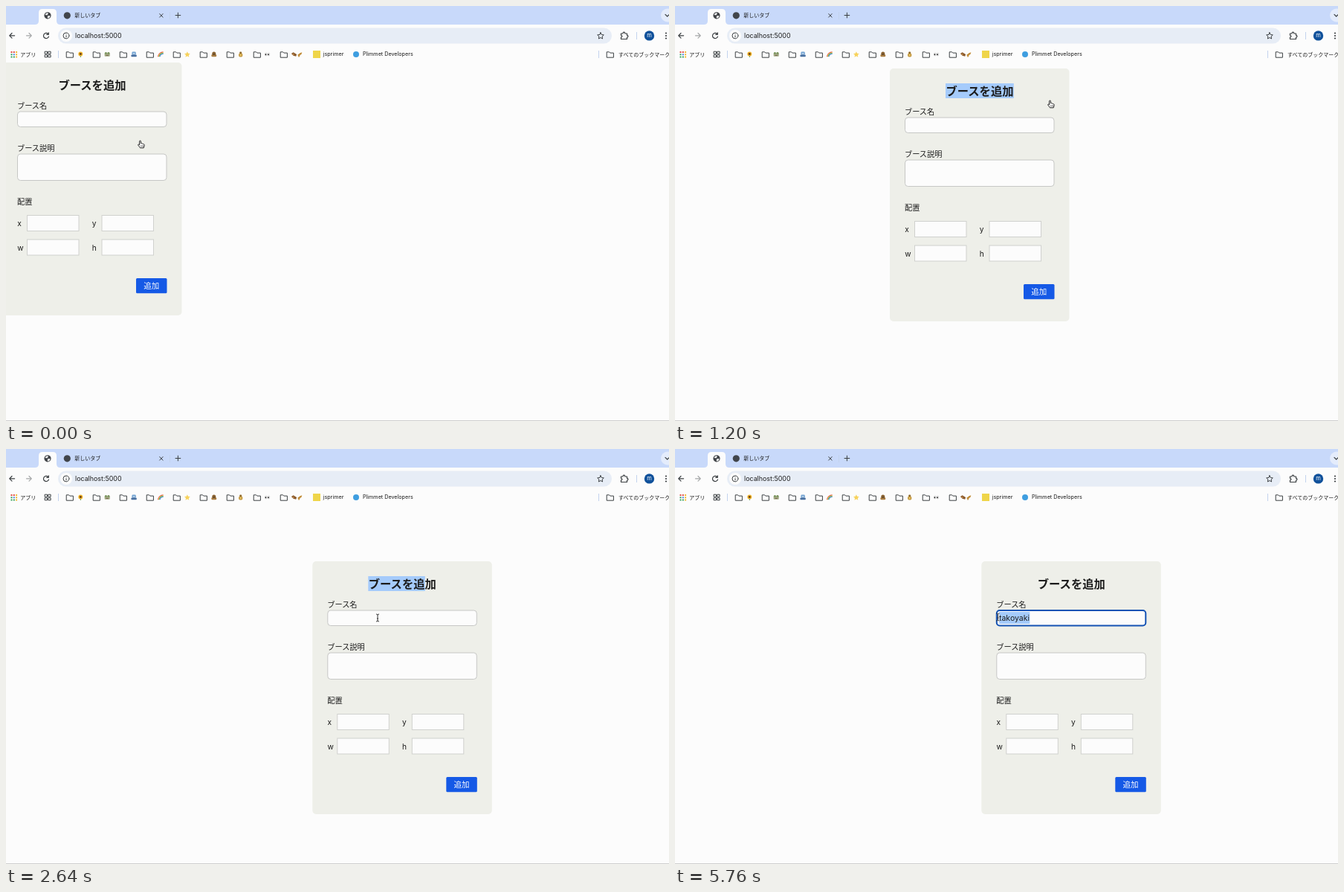
Recreate the animation shown at these times as an HTML page. Size 892 by 558 pixels, loop 5840 ms.

```html
<!DOCTYPE html>
<html lang="ja">
<head>
<meta charset="utf-8">
<title>ブースを追加</title>
<style>
html, body { margin: 0; width: 100%; height: 100%; overflow: hidden; background: #fcfcfc; }
svg { display: block; width: 892px; height: 558px; }
text { font-family: Inter, "Noto Sans CJK JP", sans-serif; fill: #1c1c1c; white-space: pre; }
.line { fill: none; stroke: #3c4043; stroke-width: 1.2; stroke-linecap: round; stroke-linejoin: round; }
.thin { stroke-width: 1; }
.field { fill: #fcfcfc; stroke: #c6c7c5; stroke-width: 1; }
.small { stroke: #d0d1ce; }
.focus { stroke: #1453b4; stroke-width: 2; }
</style>
</head>
<body>
<svg viewBox="0 0 892 558">
  <g id="chrome"></g>
  <g id="panel"></g>
  <g id="hand" stroke="#222" stroke-linejoin="round">
    <path d="M-2.400 .9V-4a.9 .9 0 0 1 1.800 0V-1.200c.6-.5 1.400-.3 1.700 .3 .6-.3 1.300 0 1.500 .6 .8-.2 1.500 .3 1.500 1.100 0 1.700-.3 2.500-.9 4H-1.500c-.5-1.300-1.700-2.200-2.700-3.600-.6-1 .6-1.700 1.800-.3z" fill="#fff"/>
    <path d="M-.3 1.400v2M1.200 1.400v2M2.600 1.400v2" stroke-width=".6"/>
  </g>
  <path id="beam" d="M-2-5q2 0 2 1.500q0-1.500 2-1.500M0-3.500v7M-2 5q2 0 2-1.500q0 1.500 2 1.500M-1 1h2" fill="none" stroke="#222" stroke-width=".9"/>
</svg>
<script>
const LOOP = 5840, STEP = 80;
const CHAR = 15.3; // heading character width
const $ = id => document.getElementById(id);
const rect = (x, y, w, h, r, attrs) => `<rect x="${x}" y="${y}" width="${w}" height="${h}" rx="${r}" ${attrs}/>`;
const dot = (x, y, r, color) => `<circle cx="${x}" cy="${y}" r="${r}" fill="${color}"/>`;
const line = (d, kind = '') => `<path class="line ${kind}" d="${d}"/>`;
const fill = (d, color) => `<path d="${d}" fill="${color}"/>`;
const text = (x, y, size, str, attrs = '') => `<text x="${x}" y="${y}" font-size="${size}" ${attrs}>${str}</text>`;
const folder = x => line(`M${x + .6} 61.8h3l1.2 1.3h4.6v6.1h-8.8z`, 'thin');
const divider = (x, y, h) => rect(x, y, 1, h, 0, 'fill="#c3d3ee"');

function drawChrome() {
  const apps = ['#e04a3f', '#e04a3f', '#f2b72f', '#35a15a', '#4a82e8', '#f2b72f', '#35a15a', '#35a15a', '#f2b72f'];
  // small bookmark pictures, each centred on 0,0
  const icons = [
    dot(0, -.6, 3.3, '#f0b429') + dot(0, -.6, 1.6, '#6b3f16') + rect(-.5, 2.4, 1, 2, 0, 'fill="#4d8b3a"'),
    rect(-4, -2.5, 8, 5.5, 1, 'fill="#a4ad87"') + dot(-2, -1.8, 1.4, '#77935b') + dot(2, -1.8, 1.4, '#77935b') + rect(-2, 1, 4, 1, 0, 'fill="#725c44"'),
    rect(-3, -3.8, 6, 4.5, 1.5, 'fill="#6d9fd0"') + rect(-4, .5, 8, 3.2, 1, 'fill="#486fa0"') + rect(-1.5, -2, 3, 1.5, 0, 'fill="#d6e5f2"'),
    ['#e2574c', '#f2b83c', '#5cae61', '#5a8fd8'].map((c, i) =>
      `<path d="M${-4 + i} 3.5A${8 - i} ${8 - i} 0 0 1 4 ${-3.5 + i}" fill="none" stroke="${c}" stroke-width="1.2"/>`).join(''),
    fill('M0-4.2l1.3 2.8 3 .4-2.2 2.1.5 3-2.6-1.5-2.6 1.5.5-3-2.2-2.1 3-.4z', '#f7d25c'),
    dot(0, -1, 2.8, '#8a6231') + rect(-3.8, 0, 7.6, 3.6, 1.5, 'fill="#a97d43"') + rect(-2, -.5, 4, 1.2, 0, 'fill="#4c3822"'),
    dot(0, 1, 3, '#c59a45') + rect(-1.5, -4, 3, 3, 1, 'fill="#8f6a2b"') + dot(0, 1, 1.1, '#f0d36b'),
    [-2, 2].map(x => `<ellipse cx="${x}" rx="1.7" ry="2.5" fill="#eee" stroke="#bbb" stroke-width=".4"/>` + dot(x - .4, .3, 1, '#222')).join(''),
    fill('M-4-1l3-2 5 3-1 3-4-1z', '#8a5a2c') + dot(-1, 0, 1, '#c98f4f') + fill('M5 1l4-3 3-1-1 3-2 1-1 3h-1.5l-.2-2z', '#c08a35')
  ];
  $('chrome').innerHTML =
    rect(0, 0, 892, 25, 0, 'fill="#c8d9fa"') +
    fill('M39 25q5 0 5-5V9q0-5 5-5h14q5 0 5 5v11q0 5 5 5z', '#fcfcfc') +
    // tabs
    dot(56, 12.8, 4.6, '#3f4246') + fill('M52.5 11l3-2 1.5 1.3-1.6 1.9h-1.8zM56.5 13h3l-.8 2.5-2 1.2-1.2-1.5z', '#eee') +
    dot(82.3, 12.8, 4.6, '#41454b') +
    text(92.3, 15.4, 7, '新しいタブ') +
    line('M206.7 10.5l4.4 4.6M211.1 10.5l-4.4 4.6', 'thin') +
    divider(220, 8, 10) + line('M228 12.5h6.8M231.4 9.1v6.8', 'thin') +
    dot(890, 12.5, 9, '#e4ecfc') + line('M887 11.3l2.7 2.7 2.7-2.7') +
    // toolbar
    line('M11.6 39.8H5M8 36.5l-3.3 3.3L8 43.1') +
    `<g opacity=".45">${line('M27.5 39.8h6.6M31 36.5l3.3 3.3-3.3 3.3')}</g>` +
    line('M56.7 37.5a3.6 3.6 0 1 0 .8 3.5M57.3 35.9v2.4h-2.6') +
    rect(70, 29.5, 745, 21, 10.5, 'fill="#e7edf6"') +
    dot(81, 40, 8, '#fcfcfc') +
    line('M85 39.9a4 4 0 1 1-8 0a4 4 0 1 1 8 0M81 39.8v2M81 37.9v.01', 'thin') +
    text(93, 43.2, 8.9, 'localhost:5000') +
    line('M800 35.7l1.3 2.8 3 .4-2.2 2.1.5 3-2.6-1.5-2.6 1.5.5-3-2.2-2.1 3-.4z', 'thin') +
    line('M827.5 37h2.6q0-1.8 1.3-1.8t1.3 1.8h2.8v2.4q1.5 0 1.5 1.3t-1.5 1.3v2.5h-8v-2.6q1.5 0 1.5-1.2t-1.5-1.2z') +
    divider(848, 35, 10) +
    dot(865.5, 39.9, 6.7, '#10519b') + text(865.5, 42.3, 7.5, 'm', 'text-anchor="middle" style="fill:#fff"') +
    [36.5, 40, 43.5].map(y => dot(888, y, 1.1, '#3c4043')).join('') +
    // bookmarks
    apps.map((c, i) => rect(6.5 + i % 3 * 3.3, 61 + (i / 3 | 0) * 3.3, 2, 2, .3, `fill="${c}"`)).join('') +
    text(19.2, 67.5, 7, 'アプリ') +
    [0, 1, 2, 3].map(i => rect(52.5 + i % 2 * 4.6, 61.2 + (i >> 1) * 4.6, 3, 3, 0, 'class="line thin"')).join('') +
    divider(70, 60, 10) +
    icons.map((icon, i) => folder(81 + 36 * i) + `<g transform="translate(${100.3 + 35.9 * i} 65) scale(.9)">${icon}</g>`).join('') +
    rect(413, 60, 10, 10, 0, 'fill="#efd54a"') + text(426.7, 67.3, 7.2, 'jsprimer') +
    dot(471, 65, 4, '#3e9ee0') + text(480, 67.3, 7.2, 'Plimmet Developers') +
    divider(797, 60, 10) + folder(808) + text(824, 67.5, 7, 'すべてのブックマーク') +
    rect(0, 557, 892, 1, 0, 'fill="#cfcfcf"');
}

function drawPanel() {
  const small = (x, y, name) => text(x - 12.7, y + 15, 10.2, name) + rect(x + .5, y + .5, 69.5, 21, 0, 'class="field small"');
  $('panel').innerHTML =
    rect(0, 0, 241.5, 340, 5, 'fill="#eeefe9"') +
    rect(75, 20, 0, 20, 0, 'id="titleSel" fill="#a5cbfb"') +
    text(121, 36, CHAR, 'ブースを追加', 'text-anchor="middle" font-weight="700"') +
    text(20, 61.5, 10.2, 'ブース名') +
    rect(20.5, 66, 200.5, 20.5, 4, 'id="name" class="field"') +
    rect(24, 68, 0, 16, 0, 'id="nameSel" fill="#a5cbfb"') +
    text(23.7, 80, 10.5, '', 'id="typed"') +
    rect(0, 70, .8, 12, 0, 'id="caret" fill="#222"') +
    text(20, 118.5, 10.2, 'ブース説明') +
    rect(20.5, 123, 200.5, 35.5, 4, 'class="field"') +
    text(20, 190.5, 10.2, '配置') +
    small(33, 205, 'x') + small(133.5, 205, 'y') +
    small(33, 237.5, 'w') + small(133.5, 237.5, 'h') +
    rect(180, 290, 41.5, 20.3, 1.5, 'fill="#1559e6"') +
    text(200.7, 304.2, 10.5, '追加', 'text-anchor="middle" style="fill:#fff"');
}

// time, x, y
const panelPath = [
  [0, -5, 76], [640, -5, 76], [720, 70, 92], [800, 230, 132], [880, 312, 158],
  [960, 375, 225], [1040, 330, 258], [1120, 232, 172], [1200, 289, 84],
  [1280, 440, 140], [1360, 345, 270], [1440, 195, 254], [1520, 230, 125],
  [1600, 370, 88], [1680, 440, 112], [1760, 426, 135], [1920, 418, 146], [2080, 412.3, 151]
];
const pointerPath = [
  [0, 182, 186], [320, 170, 150], [640, 148, 122], [720, 265, 155], [880, 469, 208],
  [960, 528, 290], [1040, 440, 290], [1120, 375, 165], [1200, 506, 132],
  [1280, 615, 215], [1360, 450, 325], [1440, 273, 267], [1520, 390, 145],
  [1600, 565, 125], [1680, 602, 160], [1760, 575, 176], [2080, 561, 192],
  [2640, 500, 227], [4160, 520, 231], [5120, 481, 227], [5600, 434.5, 226]
];

const clamp = (v, lo, hi) => Math.max(lo, Math.min(hi, v));

function along(path, t) {
  const i = path.findIndex(p => p[0] > t);
  if (i < 0) return path[path.length - 1].slice(1);
  const [a, b] = [path[i - 1], path[i]];
  const k = (t - a[0]) / (b[0] - a[0]);
  return [a[1] + (b[1] - a[1]) * k, a[2] + (b[2] - a[2]) * k];
}

const set = (id, attrs) => { for (const k in attrs) $(id).setAttribute(k, attrs[k]); };
const show = (id, on) => set(id, { visibility: on ? 'visible' : 'hidden' });

function draw(t) {
  const [px, py] = along(panelPath, t), [cx, cy] = along(pointerPath, t);
  set('panel', { transform: `translate(${px} ${py})` });
  for (const id of ['hand', 'beam']) set(id, { transform: `translate(${cx} ${cy})` });
  show('hand', t < 2480);
  show('beam', t >= 2480 && t < 3040 || t >= 4160);

  // dragging over the heading selects whole characters
  const chars = t < 2080 ? clamp(Math.round((cx - px - 75) / CHAR), 2, 6) : 5;
  set('titleSel', { width: t > 880 && t < 2720 ? chars * CHAR : 0 });

  const focus = t >= 2720;
  $('name').classList.toggle('focus', focus);
  $('typed').textContent = 'takoyaki'.slice(0, clamp(Math.floor((t - 2940) / 100), 0, 8));
  const end = 24 + $('typed').getComputedTextLength();
  const selecting = t >= 5200;
  const start = clamp(cx - px, 24, end);
  set('nameSel', { x: start, width: selecting ? end - start : 0 });
  set('caret', { x: end });
  show('caret', focus && !selecting && (t < 3740 || (t - 3740) % 1000 < 500));
}

drawChrome();
drawPanel();
draw(0);
const began = performance.now();
function tick() {
  draw(Math.floor((performance.now() - began) % LOOP / STEP) * STEP);
  requestAnimationFrame(tick);
}
requestAnimationFrame(tick);
</script>
</body>
</html>
```
